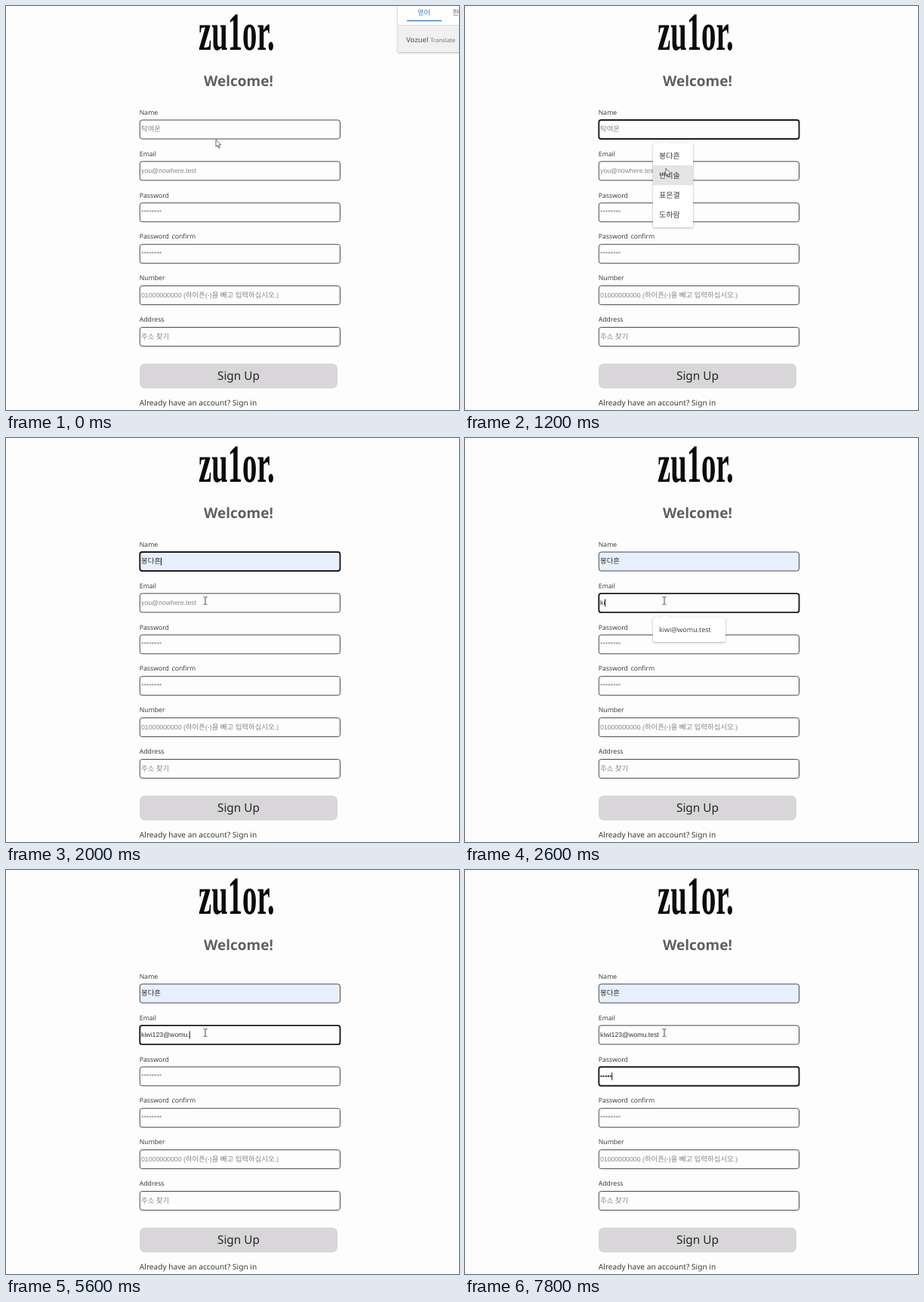
Write an HTML page that moves like this. It is 600 by 535 pixels and loops after 8 s.

```html
<!DOCTYPE html>
<html lang="en">
<head>
<meta charset="utf-8">
<title>Sign up form</title>
<style>
  html, body { margin: 0; width: 100%; height: 100%; overflow: hidden; background: #fefdfe; }
  svg { display: block; width: 100%; height: 100%; }
  text { white-space: pre; text-rendering: geometricPrecision; }
  .label { font: 8.7px "Open Sans", "Noto Sans", sans-serif; fill: #333; word-spacing: .17em; }
  .value { font: 8.75px "Liberation Sans", "Noto Sans CJK KR", sans-serif; }
  .item { font: 9px "Open Sans", "Noto Sans CJK KR", sans-serif; fill: #3c3c3c; }
  .item.ko { font-size: 10.1px; }
  .shadow { filter: drop-shadow(0 1px 1.6px rgba(0, 0, 0, .3)); }
  .brand { font: bold 71px "Liberation Serif", serif; fill: #0b0b0b; }
  .title { font: bold 19px "Open Sans", "Noto Sans", sans-serif; fill: #5f5f5f; text-anchor: middle; }
  .button { font: 15.4px "Noto Sans", sans-serif; fill: #262626; text-anchor: middle; }
  .foot { font: 10.15px "Noto Sans", sans-serif; fill: #3a3a3a; }
  .panel { font: 9.3px "Open Sans", "Noto Sans CJK KR", sans-serif; }
</style>
</head>
<body>
<svg id="stage" viewBox="0 0 600 535" xmlns="http://www.w3.org/2000/svg">
  <rect width="600" height="535" fill="#fefdfe"/>
  <text class="brand" transform="translate(255 58) scale(.545 1)">zu1or.</text>
  <text class="title" x="308" y="105.5">Welcome!</text>
  <g id="form"></g>
  <rect x="177" y="473.5" width="262" height="33" rx="7" fill="#d8d6d8"/>
  <text class="button" x="308" y="495">Sign Up</text>
  <text class="foot" x="176.8" y="528.5">Already have an account? Sign in</text>

  <g id="panel" class="panel">
    <g class="shadow">
      <rect x="519" y="-6" width="90" height="67" rx="2" fill="#fff"/>
      <path d="M519 26H609V61H521Q519 61 519 59Z" fill="#f0f0f1"/>
    </g>
    <path d="M519 25.5H600" stroke="#dedede"/>
    <text x="545" y="11.5" fill="#3f83c4">영어</text>
    <text x="591.5" y="11.5" fill="#666">한</text>
    <path d="M531 19.5H577" stroke="#3f83c4" stroke-width="1.3"/>
    <text x="530" y="47.5" fill="#6c6c6c" font-weight="600">Vozuel</text>
    <text x="562" y="47.5" fill="#6c6c6c" font-size="7.8">Translate</text>
  </g>

  <g id="names"></g>
  <g id="mails"></g>

  <path id="arrow" d="M0 0V9.6L2.2 7.6L3.8 11.2L5.3 10.5L3.7 7H6.6Z" fill="#fff" stroke="#555" stroke-width=".9" stroke-linejoin="round"/>
  <path id="beam" d="M-2.4 -5Q-.4 -5 0 -4Q.4 -5 2.4 -5M0 -4V4M-2.4 5Q-.4 5 0 4Q.4 5 2.4 5" fill="none" stroke="#444" stroke-width="1"/>
</svg>
<script>
const LOOP = 8000, LEFT = 177, TOP = 151, PITCH = 54.9;
const MAIL = 'kiwi123@womu.test';
const PEOPLE = ['봉다흔', '변리솔', '표은결', '도하람'];
const FIELDS = [
  ['Name', '탁여온'],
  ['Email', 'you@nowhere.test'],
  ['Password', '********'],
  ['Password confirm', '********'],
  ['Number', '01000000000 (하이픈(-)을 빼고 입력하십시오.)'],
  ['Address', '주소 찾기']
];

const $ = id => document.getElementById(id);

function add(parent, tag, attrs, text) {
  const el = document.createElementNS('http://www.w3.org/2000/svg', tag);
  set(el, attrs);
  if (text) el.textContent = text;
  return parent.appendChild(el);
}

function set(el, attrs) {
  for (const k in attrs) el.setAttribute(k, attrs[k]);
}

const show = (el, on) => el.setAttribute('visibility', on ? 'visible' : 'hidden');

// Hangul is set slightly larger than Latin inside the fields.
function write(el, text) {
  if (el.shown === text) return;
  el.shown = text;
  el.textContent = '';
  for (const run of text.split(/([가-힣]+)/)) {
    if (run) add(el, 'tspan', /[가-힣]/.test(run) ? { 'font-size': 9.45 } : {}, run);
  }
}

const fields = FIELDS.map(([label, hint], i) => {
  const y = TOP + i * PITCH, form = $('form');
  add(form, 'text', { class: 'label', x: LEFT - .2, y: y - 7.3 }, label);
  return {
    hint, y,
    box: add(form, 'rect', { x: LEFT + .3, y, width: 265.2, height: 25, rx: 3 }),
    text: add(form, 'text', { class: 'value', x: LEFT + 2, y: y + 15.3 }),
    caret: add(form, 'path', { stroke: '#111', 'stroke-width': 1 })
  };
});

function drawField(i, value, focus, caret, fill = '#fefdfe') {
  const f = fields[i];
  set(f.box, { fill, stroke: focus ? '#1c1c1c' : '#4a4a4a', 'stroke-width': focus ? 1.9 : 1 });
  write(f.text, value || f.hint);
  set(f.text, { fill: value ? '#333' : '#868686' });
  show(f.caret, caret);
  if (caret) {
    const x = LEFT + 2.4 + (value ? f.text.getComputedTextLength() : 0);
    set(f.caret, { d: `M${x} ${f.y + 7.5}v10` });
  }
}

function dropdown(group, y, w, h) {
  const g = add(group, 'g', { class: 'shadow' });
  add(g, 'path', { d: `M251 ${y}H260L265 ${y - 4.5}L270 ${y}H${247 + w}q2 0 2 2v${h - 4}q0 2 -2 2H251q-2 0 -2 -2v${4 - h}q0 -2 2 -2Z`, fill: '#fff' });
}

dropdown($('names'), 181.5, 53, 111.5);
const hover = add($('names'), 'rect', { x: 249, width: 53, height: 26.2, fill: '#e5e3e5' });
PEOPLE.forEach((p, i) => add($('names'), 'text', { class: 'item ko', x: 257, y: 201.8 + i * 26.2 }, p));

dropdown($('mails'), 237.5, 96, 32.5);
add($('mails'), 'text', { class: 'item', x: 257, y: 257 }, 'kiwi@womu.test');

// Latest entry whose time has passed.
const at = (t, steps) => steps.filter(s => s[0] <= t).pop().slice(1);

const POINTER = [
  [0, 'arrow', 278, 177],
  [200, 'beam', 272, 168],
  [400, 'beam', 265, 165],
  [1000, 'arrow', 266, 194],
  [1200, 'arrow', 266, 215],
  [1400, 'arrow', 266, 203],
  [1600, 'arrow', 265, 197],
  [2000, 'beam', 264, 215.5]
];

function typed(t) {
  const keys = from => Math.floor((t - from) / 200);
  if (t < 2600) return 0;
  if (t < 4400) return Math.min(7, 2 + keys(2600));
  if (t < 4800) return 8;
  return Math.min(MAIL.length, 9 + keys(4800));
}

function render(t) {
  show($('panel'), t < 200);

  const [focus] = at(t, [[0, -1], [400, 0], [2200, 1], [7000, 2]]);
  const picked = t >= 1600, chars = typed(t);
  const [dots] = at(t, [[0, 0], [7600, 3], [7800, 5]]);

  drawField(0, picked ? PEOPLE[0] : '', focus === 0, focus === 0 && t >= 1800, picked ? '#e6effb' : undefined);
  drawField(1, MAIL.slice(0, chars), focus === 1, focus === 1);
  drawField(2, '•'.repeat(dots), focus === 2, focus === 2);
  for (let i = 3; i < fields.length; i++) drawField(i, '', false, false);

  const [row] = at(t, [[0, -1], [1000, 0], [1200, 1], [1400, 0]]);
  const open = t >= 600 && t < 1800;
  show($('names'), open);
  show(hover, open && row >= 0);
  set(hover, { y: 184.8 + row * 26.2 });
  show($('mails'), chars >= 2 && chars <= 4);

  const [kind, x, y] = at(t, POINTER);
  for (const id of ['arrow', 'beam']) {
    show($(id), id === kind);
    set($(id), { transform: `translate(${x} ${y})` });
  }
}

const start = performance.now();
function frame() {
  render((performance.now() - start) % LOOP);
  requestAnimationFrame(frame);
}
frame();
</script>
</body>
</html>
```
